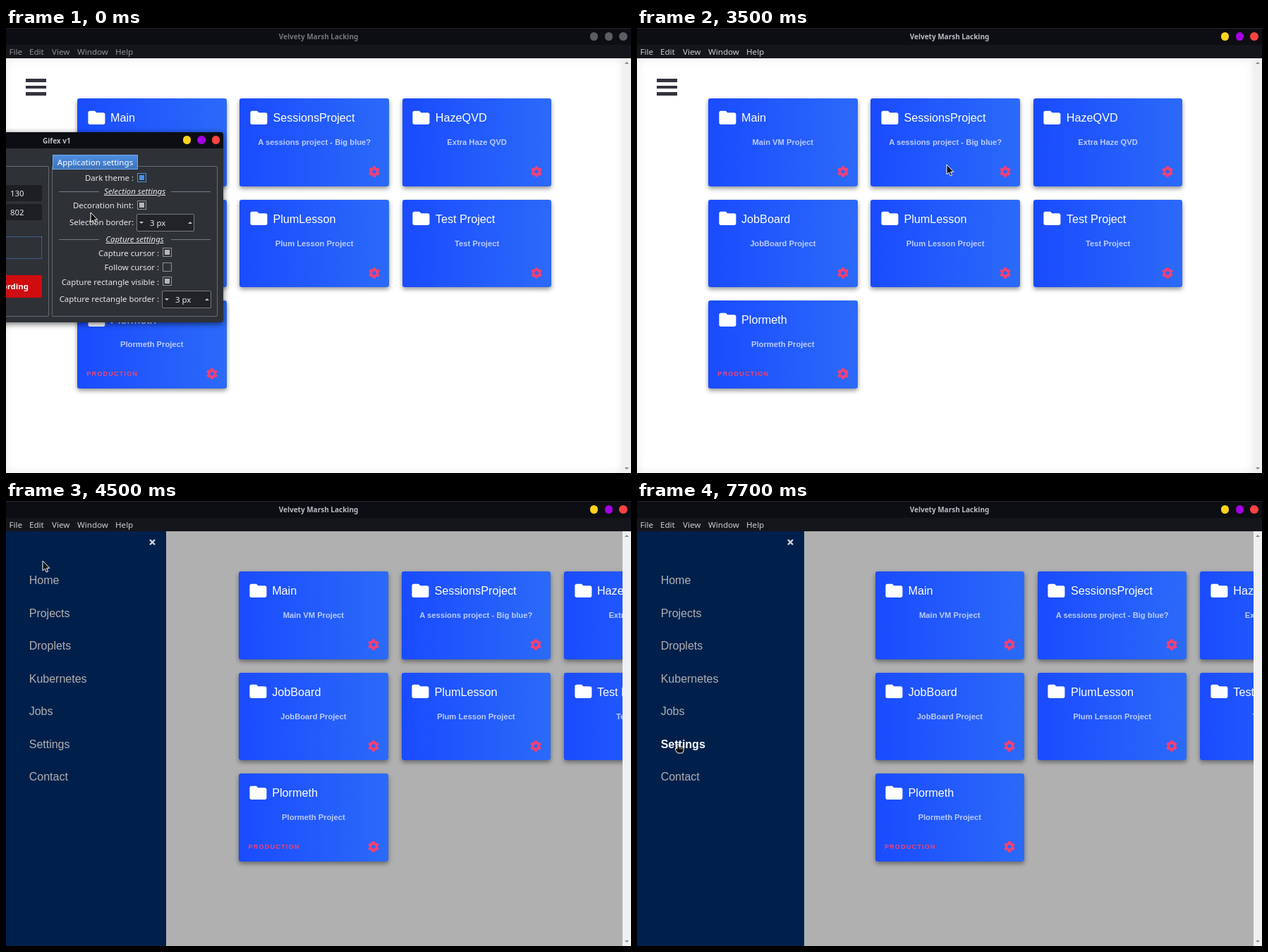
These frames come from a looping animation (886 px wide and 632 px high, 8000 ms). An HTML page:

```html
<!DOCTYPE html>
<html lang="en">
<head>
<meta charset="utf-8">
<title>Project dashboard</title>
<style>
html, body { margin: 0; width: 100%; height: 100%; overflow: hidden; background: #fff; }
#stage {
  position: relative; width: 886px; height: 632px; overflow: hidden; cursor: none;
  font: 11.6px "Noto Sans", "Open Sans", sans-serif; white-space: nowrap;
}
#stage *, #stage *::before { box-sizing: border-box; }
#stage div, #stage span, #stage svg { position: absolute; }

/* Motion is sampled by the script through --at */
#side, #grid, #pointer { animation: 8s infinite paused; animation-delay: var(--at, 0ms); }
#side { animation-name: open; animation-timing-function: ease; }
#grid { animation-name: push; animation-timing-function: ease; }
#pointer { animation-name: point; animation-timing-function: linear; }
@keyframes open { 0%, 51.35% { width: 0 } 57.91%, 100% { width: 236.7px } }
@keyframes push { 0%, 51.4% { left: 0 } 57.65%, 100% { left: 236.5px } }
@keyframes point {
  0% { transform: translate(120px, 262px) }
  6.25% { transform: translate(345px, 474px) }
  11.25% { transform: translate(590px, 376px) }
  12.5% { transform: translate(500px, 310px) }
  15% { transform: translate(289px, 215px) }
  16.25% { transform: translate(340px, 143px) }
  18.75%, 42.5% { transform: translate(454px, 194px) }
  43.75% { transform: translate(439px, 194px); animation-timing-function: ease-in-out }
  50% { transform: translate(53px, 85px) }
  51.25%, 57.5% { transform: translate(52px, 85px) }
  62.5%, 63.75% { transform: translate(67px, 116px) }
  65%, 68.75% { transform: translate(72px, 117px) }
  73.75%, 76.25% { transform: translate(76px, 161px) }
  78.75%, 81.25% { transform: translate(76px, 204px) }
  86.25%, 88.75% { transform: translate(75px, 251px) }
  92.5%, 93.75% { transform: translate(62px, 298px) }
  96.25%, 100% { transform: translate(59px, 345px) }
}

/* Window frame */
#bar { left: 0; top: 0; width: 886px; height: 24px; background: #0d0e13; border-top: 1px solid #24252c; }
#menu { left: 0; top: 24px; width: 886px; height: 19px; background: #15161b; color: #8f9195; line-height: 19px; }
.title { font-size: 10px; font-weight: bold; line-height: 24px; text-align: center; color: #b9bdc3; }
#bar .title { left: 0; top: -1px; width: 886px; color: #74777c; }
.dot { width: 11.6px; height: 11.6px; margin: -5.8px; border-radius: 50%; background: var(--c); }
#bar .dot { top: 11px; background: #5b5d62; }
.focus #bar .dot { background: var(--c); }
.focus #bar .title { color: #b9bdc3; }
.focus #menu { color: #cbcdd0; }

/* Page */
#page { left: 0; top: 43px; width: 874px; height: 589px; overflow: hidden; background: #fff; box-shadow: inset 0 0 14px rgba(0,0,0,.09); }
.opened #page { background: #b0b0b0; box-shadow: none; }
#burger { left: 28px; top: 29px; width: 29px; height: 24px; background: repeating-linear-gradient(#33343f 0 4.7px, transparent 4.7px 9.6px); }
.opened #burger { display: none; }
#grid { top: 0; }
#scroll { right: 0; top: 43px; width: 12px; height: 589px; background: #f0f0f0; }
.tri { border: 3.2px solid transparent; }
.card {
  width: 211.5px; height: 124.5px; border-radius: 3px; color: #fff;
  font-family: "Liberation Sans", Arial, sans-serif;
  background: linear-gradient(90deg, #1a4bff, #2b6af8);
  box-shadow: 0 3px 6px rgba(0,0,0,.42);
}
.card .name { left: 47px; top: 15px; font-size: 16.2px; line-height: 24px; }
.card .desc { left: 0; top: 52px; width: 100%; font-size: 11.2px; line-height: 20px; font-weight: bold; text-align: center; color: #bccbff; }
.card .tag { left: 13.3px; top: 94px; font-size: 9px; line-height: 20px; font-weight: bold; letter-spacing: 1.25px; color: #f4436f; }
.card .folder { left: 12.6px; top: 12.6px; }
.card .gear { left: 182.5px; top: 96px; }

/* Side menu */
#side { left: 0; top: 43px; height: 589px; overflow: hidden; background: #00204b; }
#side p {
  margin: 0; padding-left: calc(10% + 10px); line-height: 46.5px; color: #b0b0b0;
  font-family: "Liberation Sans", Arial, sans-serif; font-size: 16px;
}
#side p:first-of-type { margin-top: 47.3px; }
#side p.on { color: #fff; font-weight: bold; }
#side svg { right: 15px; top: 10.5px; }

/* Settings dialog */
#dialog {
  left: -40px; top: 148px; width: 348px; height: 270px; border-radius: 4px; color: #e8e9ea;
  background: #2e3136; box-shadow: 0 2px 9px rgba(0,0,0,.6); font-size: 11.4px;
}
.focus #dialog { display: none; }
#dialog .in { left: 40px; top: -148px; }
#dialog .head { left: 0; top: 0; width: 100%; height: 23px; border-radius: 4px 4px 0 0; background: #0d0e13; }
#dialog .frame { border: 1px solid #676b71; border-radius: 2px; }
#dialog .field { background: #1d1f23; border-radius: 2px; line-height: 23px; }
#dialog .txt { line-height: 20px; margin-top: -10px; }
#dialog .sect { left: 75px; width: 215px; text-align: center; font-style: italic; text-decoration: underline; }
#dialog .sect::before {
  content: ""; position: absolute; left: 0; top: 10px; width: 100%; height: 1px;
  background: linear-gradient(90deg, #777b81 57px, transparent 57px 159px, #777b81 159px);
}
.check { width: 13px; height: 13px; border: 1px solid #8d9095; }
.check.set { background: #b5b7ba content-box; padding: 2px; }
.check.blue { border-color: #4a90e8; background-color: #4a90e8; }
.spin { height: 25px; border: 1px solid #777b81; background: #212327; line-height: 23px; border-radius: 2px; }

.hand #arrow, #hand { display: none; }
.hand #hand { display: block; }
#pointer { left: 0; top: 0; }
#pointer svg { overflow: visible; left: 0; top: 0; }
</style>
</head>
<body>
<svg width="0" height="0" style="position:absolute">
  <symbol id="folder" viewBox="0 0 24 24"><path fill="#fff" d="M10 4H4c-1.1 0-2 .9-2 2v12c0 1.1.9 2 2 2h16c1.1 0 2-.9 2-2V8c0-1.1-.9-2-2-2h-8l-2-2z"/></symbol>
  <symbol id="gear" viewBox="-8 -8 16 16">
    <g fill="none" stroke="#f93f72">
      <circle r="4.5" stroke-width="3.4"/>
      <path id="tooth" stroke-width="4" d="M0-7.8V-5M0 7.8V5"/>
      <use href="#tooth" transform="rotate(60)"/><use href="#tooth" transform="rotate(120)"/>
    </g>
  </symbol>
</svg>
<div id="stage">
  <div id="page"><div id="burger"></div><div id="grid"></div></div>
  <div id="scroll">
    <div class="tri" style="left:3px;top:2px;border-bottom-color:#888"></div>
    <div class="tri" style="left:3px;bottom:2px;border-top-color:#888"></div>
  </div>
  <div id="side">
    <svg width="9" height="9"><path d="M1 1l7 7M8 1l-7 7" stroke="#d3d6da" stroke-width="2.4"/></svg>
  </div>
  <div id="bar"><div class="title">Velvety Marsh Lacking</div></div>
  <div id="menu"></div>
  <div id="dialog">
    <div class="head"></div>
    <div class="in"></div>
  </div>
  <div id="pointer">
    <svg id="arrow" width="12" height="18"><path d="M0 0V14L3.2 11.2 5.3 16 7.6 15 5.5 10.3H9.8Z" fill="#0c0c0c" stroke="#fff"/></svg>
    <svg id="hand" width="14" height="16"><path d="M-2 .8q1.3-1 2.4 0V4H5q2 .2 2 2V9.500L5.600 13H-1.500L-4.500 8.500V6.500H-2Z" fill="#0c0c0c" stroke="#fff"/><path d="M2 5v2.500M4.500 5.500v2" stroke="#fff" stroke-width=".8"/></svg>
  </div>
</div>
<script>
const stage = document.getElementById('stage');
const find = q => stage.querySelector(q);

function add(parent, cls, css, text = '') {
  const el = document.createElement('div');
  el.className = cls;
  el.style.cssText = css;
  el.textContent = text;
  parent.append(el);
  return el;
}
const box = (x, y, w, h) => `left:${x}px;top:${y}px;width:${w}px;height:${h}px;`;

function dots(parent, xs, y) {
  ['#ffd21c', '#a400e4', '#ff4242'].forEach((c, i) =>
    add(parent, 'dot', `left:${xs[i]}px;top:${y}px;--c:${c}`));
}

// Title bar and menu
dots(find('#bar'), [833.7, 854.4, 874.8], 11);
[['File', 4.5], ['Edit', 33], ['View', 65], ['Window', 101], ['Help', 155]]
  .forEach(([name, x]) => add(find('#menu'), '', `left:${x}px`, name));

// Project cards
const projects = [
  ['Main', 'Main VM Project'], ['SessionsProject', 'A sessions project - Big blue?'],
  ['HazeQVD', 'Extra Haze QVD'], ['JobBoard', 'JobBoard Project'],
  ['PlumLesson', 'Plum Lesson Project'], ['Test Project', 'Test Project'],
  ['Plormeth', 'Plormeth Project', 'PRODUCTION']
];
projects.forEach(([name, desc, tag = ''], i) => {
  const x = 101 + i % 3 * 230.4, y = 57 + Math.floor(i / 3) * 143.5;
  const card = add(find('#grid'), 'card', `left:${x}px;top:${y}px`);
  card.innerHTML = `<svg class="folder" width="28.8" height="28.8"><use href="#folder"/></svg>
    <span class="name">${name}</span><span class="desc">${desc}</span><span class="tag">${tag}</span>
    <svg class="gear" width="16" height="16"><use href="#gear"/></svg>`;
});

// Side menu
const links = ['Home', 'Projects', 'Droplets', 'Kubernetes', 'Jobs', 'Settings', 'Contact'].map(name => {
  const p = document.createElement('p');
  p.textContent = name;
  find('#side').append(p);
  return p;
});

// Settings dialog
const panel = find('#dialog .in');
const label = (right, y, text) => add(panel, 'txt', `right:${-right}px;top:${y}px`, text);
const check = (x, y, cls = 'set') => add(panel, 'check ' + cls, `left:${x}px;top:${y}px`);
function spin(x, y, w) {
  const s = add(panel, 'spin', `left:${x}px;top:${y}px;width:${w}px`);
  add(s, '', 'left:18px', '3 px');
  add(s, 'tri', 'left:3px;top:10px;border-top-color:#c5c7ca');
  add(s, 'tri', 'right:2px;top:7px;border-bottom-color:#c5c7ca');
}
add(panel, 'title', 'left:52px;top:148px', 'Gifex v1');
dots(panel, [256.4, 277, 297.4], 159);
add(panel, 'frame', box(-30, 196, 91, 214));
add(panel, 'field', box(-20, 223, 71, 23) + 'padding-left:26px', '130');
add(panel, 'field', box(-20, 250, 71, 23) + 'padding-left:26px', '802');
add(panel, '', box(-20, 296, 71, 32) + 'border:1px dotted #4a90e8');
add(panel, '', box(-40, 351, 91, 32) + 'background:#cf0c10;border-radius:2px');
add(panel, '', box(-38, 351, 70, 32) + 'line-height:32px;text-align:right;font-weight:bold;color:#fff', 'Recording');
add(panel, 'frame', box(65, 196, 235, 214));
add(panel, '', box(66, 180, 121, 21) + 'line-height:19px;text-align:center;color:#fff;font-size:11.6px;border:1px solid #73a8ec;background:linear-gradient(#4d8de0,#3d74bd)', 'Application settings');
label(181, 213, 'Dark theme :');
check(186, 206, 'set blue');
add(panel, 'txt sect', 'top:232px', 'Selection settings');
label(181, 252, 'Decoration hint:');
check(186, 245);
label(181, 276, 'Selection border:');
spin(185, 264, 82);
add(panel, 'txt sect', 'top:300px', 'Capture settings');
label(217, 320, 'Capture cursor :');
check(222, 312);
label(217, 340, 'Follow cursor :');
check(222, 333, '');
label(217, 361, 'Capture rectangle visible :');
check(222, 353);
label(217, 385, 'Capture rectangle border :');
spin(221, 373, 70);

// Time at which each link starts to be hovered
const hovers = [4900, 5700, 6200, 6700, 7300, 7600];

function draw() {
  const t = Math.floor(performance.now() % 8000 / 100) * 100;
  const hovered = hovers.filter(h => t >= h).length - 1;
  stage.style.setProperty('--at', -t + 'ms');
  stage.classList.toggle('focus', t >= 500);
  stage.classList.toggle('opened', t >= 4200);
  stage.classList.toggle('hand', hovered >= 0 || t >= 4000 && t < 4200);
  links.forEach((p, i) => p.classList.toggle('on', i === hovered));
  requestAnimationFrame(draw);
}
draw();
</script>
</body>
</html>
```
